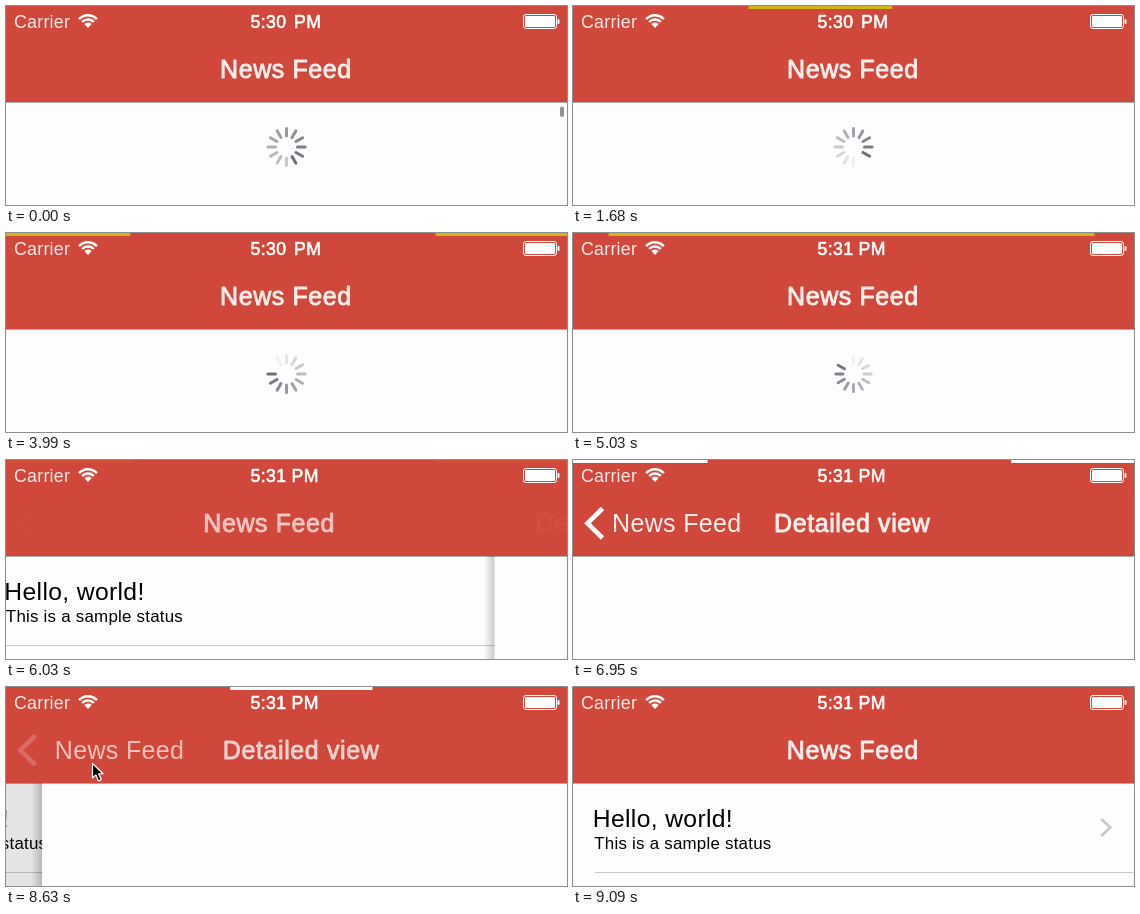
An HTML page with a canvas for the animation above (9210 ms loop, 561x199 px).

```html
<!DOCTYPE html>
<html lang="en">
<head>
<meta charset="utf-8">
<title>News Feed</title>
<style>
html, body { margin: 0; width: 100%; height: 100%; overflow: hidden; background: #fdfdfd; }
canvas { display: block; }
</style>
</head>
<body>
<canvas id="stage" width="561" height="199"></canvas>
<script>
const W = 561, H = 199, LOOP = 9210, NAV = 96;
const PUSH = 5997, POP = 8608.5;
const FONT = '"Liberation Sans", Arial, sans-serif';
const c = document.getElementById('stage').getContext('2d');

const clamp = v => Math.max(0, Math.min(1, v));
const ramp = (t, from, to) => clamp((t - from) / (to - from));
const smooth = p => p * p * (3 - 2 * p);
// Share of a critically damped spring's travel still left after ms.
const springLeft = ms => {
  const s = Math.max(0, ms) * 0.01826;
  return (1 + s) * Math.exp(-s);
};
const bend = (u, k) => u + k * u * (1 - u) * (2 * u - 1);

function rect(x, y, w, h, fill) {
  c.fillStyle = fill;
  c.fillRect(x, y, w, h);
}

// Text is set slightly open, in proportion to its size.
function text(str, x, y, size, color, weight = 0) {
  c.font = `${size}px ${FONT}`;
  c.letterSpacing = `${size * (weight ? 0.024 : 0.014)}px`;
  c.fillStyle = c.strokeStyle = color;
  c.fillText(str, x, y);
  if (weight) {
    c.lineWidth = weight;
    c.lineJoin = 'round';
    c.strokeText(str, x, y);
  }
}

function line(points, width, color, cap = 'butt') {
  c.beginPath();
  points.forEach(p => c.lineTo(...p));
  c.lineWidth = width;
  c.lineCap = cap;
  c.lineJoin = 'miter';
  c.strokeStyle = color;
  c.stroke();
}

function faded(alpha, draw) {
  if (alpha < 0.01) return;
  c.save();
  c.globalAlpha = alpha;
  draw();
  c.restore();
}

function spinner(t) {
  const gone = ramp(t, 5020, 5250);
  if (gone === 1) return;
  const steps = Math.floor(23.3 + (t - 1680) / (t < 1680 ? 73 : 80));
  const floor = 0.38 * (1 - ramp(t, 0, 500));
  c.save();
  c.translate(280.5, 141);
  c.scale(1 - gone, 1 - gone);
  for (let i = 0; i < 12; i++) {
    const age = ((5 + steps - i) % 12 + 12) % 12;
    c.save();
    c.rotate(i * Math.PI / 6);
    faded((1 - gone) * (floor + (1 - floor) * (1 - age / 11)),
      () => line([[0, -11], [0, -18.6]], 3, '#6b707b', 'round'));
    c.restore();
  }
  c.restore();
}

function scrollMark(t) {
  faded(1 - ramp(t, 450, 800), () => {
    c.beginPath();
    c.roundRect(554, 100.5, 4, 10.5 + 63 * smooth(ramp(t, 0, 350)), 2);
    c.fillStyle = '#919191';
    c.fill();
  });
}

function row(y) {
  text('Hello, world!', 20, y + 44, 24.7, '#000');
  text('This is a sample status', 21.5, y + 66, 16.9, '#000');
  line([[528.5, y + 36], [537.5, y + 44.5], [528.5, y + 53]], 2.6, '#c7c7cc');
  rect(22, y + 89, W - 22, 1, '#c8c7cc');
}

// u is 1 on the feed and 0 on the detail page.
function pages(t, u) {
  c.save();
  c.translate(-0.3 * W * (1 - u), 0);
  rect(0, NAV, W, H, '#fdfdfd');
  spinner(t);
  scrollMark(t);
  if (t > 5020) row(NAV + 105 * (1 - smooth(ramp(t, 5020, 5370))));
  c.restore();
  if (u === 1) return;
  const edge = W * u;
  rect(0, NAV, edge, H, `rgba(0,0,0,${0.11 * (1 - u) ** 2})`);
  const shade = c.createLinearGradient(edge - 11, 0, edge, 0);
  shade.addColorStop(0, 'rgba(0,0,0,0)');
  shade.addColorStop(1, `rgba(0,0,0,${0.2 * clamp(8 * (1 - u))})`);
  rect(edge - 11, NAV, 11, H, shade);
  rect(edge, NAV, W, H, '#fdfdfd');
}

function statusBar(t) {
  const late = t >= 5000;
  text('Carrier', 8, 22, 17.8, '#f9e9e7');
  text(late ? '5:31' : '5:30', 244.5, 22, 17.7, '#fff', 0.6);
  text('PM', late ? 285.5 : 288, 22, 17.7, '#fff', 0.6);

  c.strokeStyle = c.fillStyle = '#fff';
  c.lineCap = 'butt';
  c.lineWidth = 2.4;
  for (const r of [12.2, 8]) {
    c.beginPath();
    c.arc(82, 21.5, r, -Math.PI * 0.76, -Math.PI * 0.24);
    c.stroke();
  }
  c.beginPath();
  c.moveTo(82, 22);
  c.arc(82, 21.5, 5, -Math.PI * 0.76, -Math.PI * 0.24);
  c.fill();

  c.lineWidth = 1;
  c.beginPath();
  c.roundRect(517.5, 8.5, 33, 14, 2.5);
  c.stroke();
  c.beginPath();
  c.roundRect(519, 10, 30, 11, 1.2);
  c.fill();
  c.beginPath();
  c.roundRect(551.5, 13, 2, 5, 1);
  c.fill();
}

function navBar(t, u) {
  rect(0, 0, W, NAV, '#d0473c');
  rect(0, NAV, W, 1, 'rgba(0,0,0,.32)');
  const popping = t >= POP, shown = 1 - u;
  const fade = (push, pop) => shown ** (popping ? pop : push);
  faded(fade(2.2, 24), () =>
    line([[29.5, 48.5], [14.5, 63.3], [29.5, 78]], 4.6, '#fff'));
  faded(fade(2, 4.8), () =>
    text('News Feed', 39 + 175 * bend(u, 0.168), 72, 25, '#fdeeec'));
  faded(fade(1.6, 4.2), () =>
    text('Detailed view', 201 + 363 * bend(u, 0.397), 72, 25, '#fdeeec', 0.9));
  faded(u ** 3, () =>
    text('News Feed', 39 + 175 * bend(u, 0.397), 72, 25, '#fdeeec', 0.9));
  statusBar(t);
}

// Colour and gap take turns spreading from an origin near the middle.
function loader(time, start, span, color, origins) {
  if (time < start) return;
  const phase = (time - start) / span, n = Math.floor(phase);
  const p = smooth(phase - n), x = origins[n % origins.length];
  const left = x * (1 - p), right = left + W * p;
  if (n % 2) {
    rect(0, 0, left, 3, color);
    rect(right, 0, W - right, 3, color);
  } else {
    rect(left, 0, right - left, 3, color);
  }
}

function loaders(t) {
  const yellow = t < 6060 ? 1 - 0.92 * ramp(t, 5273, 5370) : 0;
  faded(yellow, () => loader(Math.min(t, 5273), 933, 320.9, '#d0b51a',
    [262, 296, 236, 312, 255, 288, 320, 245, 301, 272.7, 240, 308, 266, 277]));
  faded(1 - ramp(t, 8830, 8905), () => loader(t, 6416.5, 349.9, '#fff',
    [270, 293.4, 250, 282, 310, 241, 300.4, 284]));
}

function cursor(t) {
  if (t < 7500 || t > 8900) return;
  const come = smooth(ramp(t, 7500, 7850)), leave = smooth(ramp(t, 8680, 8890));
  c.save();
  c.translate(-14 + 100.5 * come - 50 * leave, 76.5 + 125 * leave);
  c.beginPath();
  [[0, 0], [0, 14.5], [3.4, 11.4], [6, 17.5], [8.8, 16.3], [6.2, 10.4], [10.6, 10.2]]
    .forEach(p => c.lineTo(...p));
  c.closePath();
  c.fillStyle = '#000';
  c.strokeStyle = '#fff';
  c.lineWidth = 1.2;
  c.fill();
  c.stroke();
  c.restore();
}

function draw(now) {
  const t = now % LOOP;
  const u = t < POP ? springLeft(t - PUSH) : 1 - springLeft(t - POP);
  rect(0, 0, W, H, '#fdfdfd');
  pages(t, u);
  navBar(t, u);
  loaders(t);
  cursor(t);
}

const begun = performance.now();
(function frame() {
  draw(performance.now() - begun);
  requestAnimationFrame(frame);
})();
</script>
</body>
</html>
```
